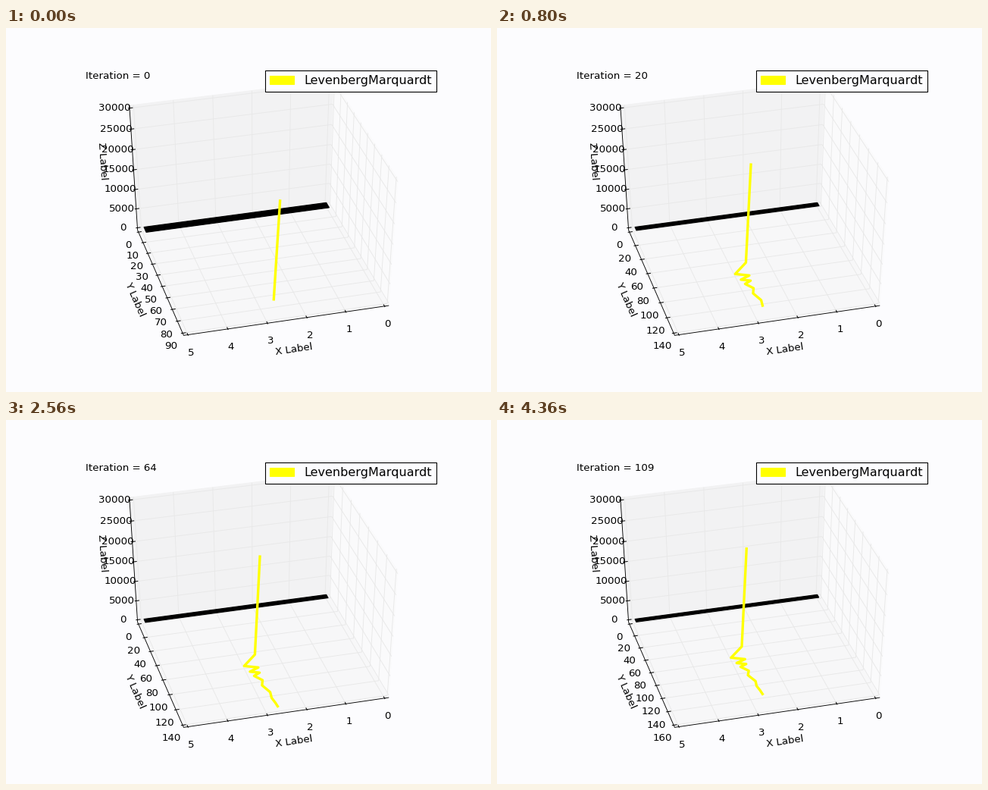
A matplotlib script that plays this animation: 640 px wide and 480 px high, repeating every 4.4 s.

```python
import numpy as np
import matplotlib.pyplot as plt
from matplotlib.animation import FuncAnimation
from matplotlib.collections import LineCollection
from matplotlib.patches import Patch, Polygon

plt.rcParams["font.family"] = "DejaVu Sans"
W, H, DPI, FRAMES, STEP = 640, 480, 80, 110, 40
PAPER, GRID = "#fcfcfe", "#e8e8e8"
WALL, FLOOR, SIDE = "#f2f2f3", "#f7f7f8", "#fafafb"
FS = 12

AZ, EL, DIST = np.radians(75), np.radians(40), 10
CA, SA, CE, SE = np.cos(AZ), np.sin(AZ), np.cos(EL), np.sin(EL)
E = 0.5 + 1 / 48          # half size of the box, with its margin
X_MAX, Z_MAX = 5, 30000


def project(p):
    """Centred unit-cube coordinates to stage pixels."""
    x, y, z = np.moveaxis(np.asarray(p, float), -1, 0)
    ground = CA * x + SA * y
    depth = DIST - CE * ground - SE * z
    u = (CA * y - SA * x) / depth
    v = (CE * z - SE * ground) / depth
    return np.stack([80 + 496 * (u + 0.095) / 0.185,
                     432 - 384 * (v + 0.095) / 0.185], -1)


def to_unit(points, y_max):
    return np.asarray(points, float) / [X_MAX, y_max, Z_MAX] - 0.5


def descent():
    """Positions (x, y, z) visited by the solver, in order."""
    first = np.array([
        (2.685, 90, 28620), (2.81, 89.6, 4600), (3.11, 92, 2500),
        (2.75, 92.5, 1700), (2.99, 95, 1420), (2.75, 96, 1000),
        (2.93, 100, 1180), (2.75, 104, 550), (2.83, 111, 680),
        (2.78, 114, 500), (2.74, 116.5, 380), (2.70, 119, 260)])
    k = np.arange(11, FRAMES)
    y = 141 - 22 * np.exp(-(k - 10) / 20)
    x = np.interp(y, [119, 128, 135, 141], [2.70, 2.75, 2.72, 2.706])
    z = np.interp(y, [119, 128], [260, 600])
    return np.vstack([first, np.column_stack([x, y, z])])


PATH = descent()


def y_scale(top):
    """Upper limit and tick step of the y axis."""
    return (90, 10) if top <= 90 else (int(np.ceil(top / 20)) * 20, 20)


fig = plt.figure(figsize=(W / DPI, H / DPI), dpi=DPI, facecolor=PAPER)
ax = fig.add_axes([0, 0, 1, 1])
ax.set(xlim=(0, W), ylim=(H, 0))
ax.axis("off")


def pane(corners, color):
    ax.add_patch(Polygon(project(corners), fc=color, ec=color, lw=0.8, zorder=1))


def lines(color, z, width=0.8):
    return ax.add_collection(LineCollection([], colors=color, linewidths=width, zorder=z))


def tick_label(pos, text="", shift=(0, 0)):
    x, y = project(pos) + shift
    return ax.text(x, y, text, fontsize=FS, ha="center", va="top", zorder=5)


def axis_label(text, pos, a, b):
    (x0, y0), (x1, y1) = project([a, b])
    angle = np.degrees(np.arctan2(y0 - y1, x1 - x0))
    x, y = project(pos)
    ax.text(x, y, text, fontsize=FS, rotation=angle, ha="center", va="center", zorder=5)


IN, OUT = 0.2 / 12, 0.1 / 12
GAP, FAR = E + 0.7 / 12, E + 1.6 / 12

pane([(-E, -E, -E), (-E, E, -E), (-E, E, E), (-E, -E, E)], SIDE)
pane([(-E, -E, -E), (E, -E, -E), (E, -E, E), (-E, -E, E)], WALL)
pane([(-E, -E, -E), (E, -E, -E), (E, E, -E), (-E, E, -E)], FLOOR)

grid, ticks = [], []
for v in range(6):
    t = v / X_MAX - 0.5
    grid.append(project([(t, E, -E), (t, -E, -E), (t, -E, E)]))
    ticks.append(project([(t, E + OUT, -E), (t, E - IN, -E)]))
    tick_label((t, GAP, -GAP), str(v))
for v in range(0, Z_MAX + 1, 5000):
    t = v / Z_MAX - 0.5
    grid.append(project([(E, -E, t), (-E, -E, t), (-E, E, t)]))
    ticks.append(project([(E + OUT, -E, t), (E - IN, -E, t)]))
    tick_label((GAP, -GAP, t), str(v), shift=(-1.5, -1.5))
lines(GRID, 2).set_segments(grid)
lines("black", 4, 0.9).set_segments(ticks)

edge = [(E, -E, E), (E, -E, -E), (E, E, -E), (-E, E, -E)]
ax.plot(*project(edge).T, color="black", lw=0.8, zorder=4)
axis_label("X Label", (0, FAR, -FAR), edge[2], edge[3])
axis_label("Y Label", (FAR, 0, -FAR), edge[1], edge[2])
axis_label("Z Label", (FAR, -FAR, 0), edge[0], edge[1])

y_grid = lines(GRID, 2)
y_ticks = lines("black", 4, 0.9)
y_labels = [tick_label((0, 0, 0)) for _ in range(10)]

sheet = ax.add_patch(Polygon([(0, 0)] * 4, fc="black", ec="black", lw=1, zorder=6))
trail, = ax.plot([], [], color="yellow", lw=3, zorder=7, solid_joinstyle="round")
counter = ax.text(104.8, 67.2, "", fontsize=FS, zorder=8)

legend = ax.legend(handles=[Patch(color="yellow", label="LevenbergMarquardt")],
                   loc="upper right", bbox_to_anchor=(0.9, 0.9), fontsize=14.4,
                   fancybox=False, framealpha=1, facecolor=PAPER, edgecolor="black")
legend.set_zorder(9)


def update(i):
    seen = PATH[:i + 2]
    y_max, step = y_scale(seen[:, 1].max())
    values = range(0, y_max + 1, step)
    ts = [v / y_max - 0.5 for v in values]
    y_grid.set_segments([project([(E, t, -E), (-E, t, -E), (-E, t, E)]) for t in ts])
    y_ticks.set_segments([project([(E + OUT, t, -E), (E - IN, t, -E)]) for t in ts])
    for label in y_labels:
        label.set_text("")
    for label, v, t in zip(y_labels, values, ts):
        label.set_text(str(v))
        label.set_position(project((GAP, t, -GAP)))

    s, z = 4.95, 500
    corners = [(0, 0, z), (s, 0, z), (s, s, z), (0, s, z)]
    sheet.set_xy(project(to_unit(corners, y_max)))
    trail.set_data(*project(to_unit(seen, y_max)).T)
    counter.set_text(f"Iteration = {i}")
    return trail, sheet, counter


anim = FuncAnimation(fig, update, frames=FRAMES, interval=STEP,
                     repeat=True, repeat_delay=0, blit=False)
plt.show()
```
